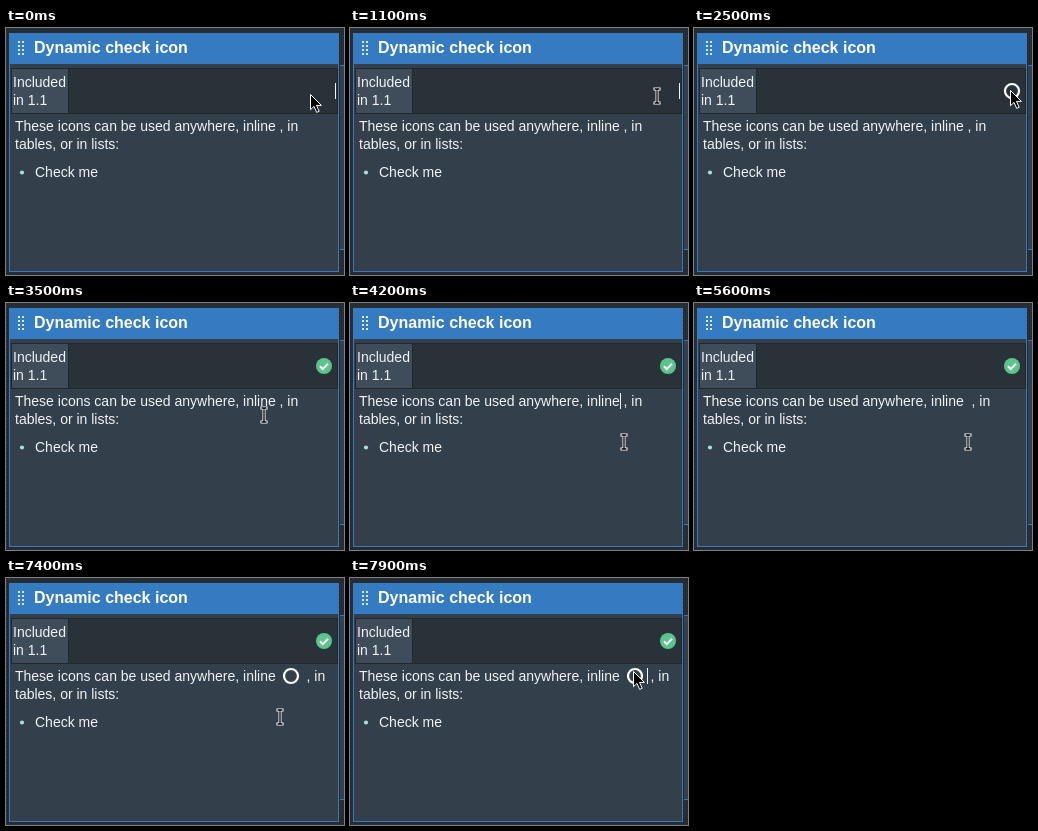
Write an HTML page that moves like this. It is 338 px wide and 247 px high and loops after 8 s.

```html
<!DOCTYPE html>
<html lang="en">
<head>
<meta charset="utf-8">
<title>Dynamic check icon</title>
<style>
  html, body { margin: 0; width: 100%; height: 100%; overflow: hidden; background: #242b32; }
  svg { display: block; width: 338px; height: 247px; }
  text { font: 14px "Liberation Sans", Arial, sans-serif; fill: #f1f3f5; white-space: pre; }
  .title { font-weight: bold; font-size: 16px; fill: #fff; }
  .ring { fill: none; stroke: #fff; stroke-width: 2.2; }
</style>
</head>
<body>
<svg viewBox="0 0 338 247">
  <defs>
    <pattern id="dots" width="4" height="4" patternUnits="userSpaceOnUse">
      <rect width="4" height="4" fill="#272e35"/>
      <rect x="1" y="1" width="1" height="1" fill="#1b2026"/>
      <rect x="3" y="3" width="1" height="1" fill="#1b2026"/>
    </pattern>
  </defs>

  <!-- Panel and its neighbour -->
  <rect width="338" height="247" fill="url(#dots)"/>
  <path d="M334 37h4v184h-4z" fill="#333f4a"/>
  <path d="M334 37.5h4M334 221.5h4" stroke="#3579c0"/>
  <rect x="3.5" y="5.5" width="329" height="238" fill="#333f4a" stroke="#3579c0"/>
  <rect x="3" y="5" width="330" height="31" fill="#357bc2"/>
  <path d="M12 14h2m2 0h2M12 18h2m2 0h2M12 22h2m2 0h2M12 26h2m2 0h2" stroke="#dce9f6" stroke-width="2"/>
  <text class="title" x="28" y="25">Dynamic check icon</text>

  <!-- Table -->
  <rect x="5.5" y="40.5" width="326" height="45" fill="#293239" stroke="#20272d"/>
  <rect x="6" y="41" width="56" height="44" fill="#3f4c5a"/>
  <path d="M62.5 40v46" stroke="#20272d"/>
  <text x="7" y="59">Included</text>
  <text x="7" y="77">in 1.1</text>

  <!-- Body -->
  <text x="9" y="103">These icons can be used anywhere, inline</text>
  <text id="tail" y="103">, in</text>
  <text x="9" y="121">tables, or in lists:</text>
  <circle cx="16" cy="144.5" r="2.1" fill="#a3e0e3"/>
  <text x="29" y="149">Check me</text>

  <!-- Editing state -->
  <text id="cellMark" y="68">!</text>
  <text id="lineMark" x="273.6" y="103">!</text>
  <circle id="cellRing" class="ring" cx="318" cy="63" r="7"/>
  <g id="cellCheck">
    <circle cx="318" cy="63" r="8" fill="#5bc48c"/>
    <path d="M314 63.3l2.8 2.8l5.2-5.4" fill="none" stroke="#fff" stroke-width="2"/>
  </g>
  <circle id="lineRing" class="ring" cx="285" cy="98" r="7"/>
  <rect id="caret" width="1" height="16" fill="#f1f3f5"/>

  <!-- Pointers -->
  <path id="arrow" d="M.5 .5v15.2l3.5-3.3l2.7 6l2.5-1.1l-2.7-5.9h4.9z" fill="#000" stroke="#fff"/>
  <g id="beam" fill="none">
    <path d="M-3.5 -7h7M-3.5 7h7M0 -7v14" stroke="#fff" stroke-width="3"/>
    <path d="M-2.5 -7h2l.5 1l.5 -1h2M-2.5 7h2l.5 -1l.5 1h2M0 -6.5v13" stroke="#000" stroke-width="1.3"/>
  </g>
</svg>
<script>
const LOOP = 8000;
const el = id => document.getElementById(id);
const show = (id, on) => el(id).setAttribute("visibility", on ? "visible" : "hidden");
const place = (id, x, y) => el(id).setAttribute("transform", `translate(${x} ${y})`);

// Each track holds its value until the next time stamp.
const pointer = [
  [0, "arrow", 304, 66], [300, "beam", 307, 68],
  [2400, "arrow", 312, 64], [2500, "arrow", 316, 62],
  [3000, "beam", 286, 88], [3100, "beam", 258, 112],
  [3600, "beam", 265, 106], [3700, "beam", 272, 99],
  [4100, "beam", 273, 122], [4200, "beam", 274, 139],
  [7500, "beam", 280, 133], [7600, "beam", 286, 126],
  [7800, "arrow", 284, 101], [7900, "arrow", 283, 93]
];
const caret = [
  [0, 329, 55], [500], [1100, 329, 55], [2300],
  [4100, 270, 90], [4600], [5000, 274, 90], [5600],
  [5700, 278, 90], [6100, 282, 90], [6400, 297, 90], [7000], [7500, 297, 90]
];
const tailX = [[0, 273.6], [5000, 277.5], [5700, 281.4], [6100, 285.3], [6400, 300.6]];
const cellMarkX = [[0, 325.1], [1300, 321.2]];

const at = (track, t) => track.findLast(key => key[0] <= t).slice(1);

function draw(t) {
  const [shape, px, py] = at(pointer, t);
  for (const id of ["arrow", "beam"]) show(id, id === shape);
  place(shape, px, py);

  const [cx, cy] = at(caret, t);
  show("caret", cx !== undefined);
  if (cx !== undefined) place("caret", cx, cy);

  el("tail").setAttribute("x", at(tailX, t)[0]);
  el("cellMark").setAttribute("x", at(cellMarkX, t)[0]);
  show("cellMark", t >= 1200 && t < 1700);
  show("cellRing", t >= 1700 && t < 2800);
  show("cellCheck", t >= 2800);
  show("lineMark", t >= 5700 && t < 6400);
  show("lineRing", t >= 6400);
}

const start = performance.now();
function tick() {
  draw((performance.now() - start) % LOOP);
  requestAnimationFrame(tick);
}
tick();
</script>
</body>
</html>
```
